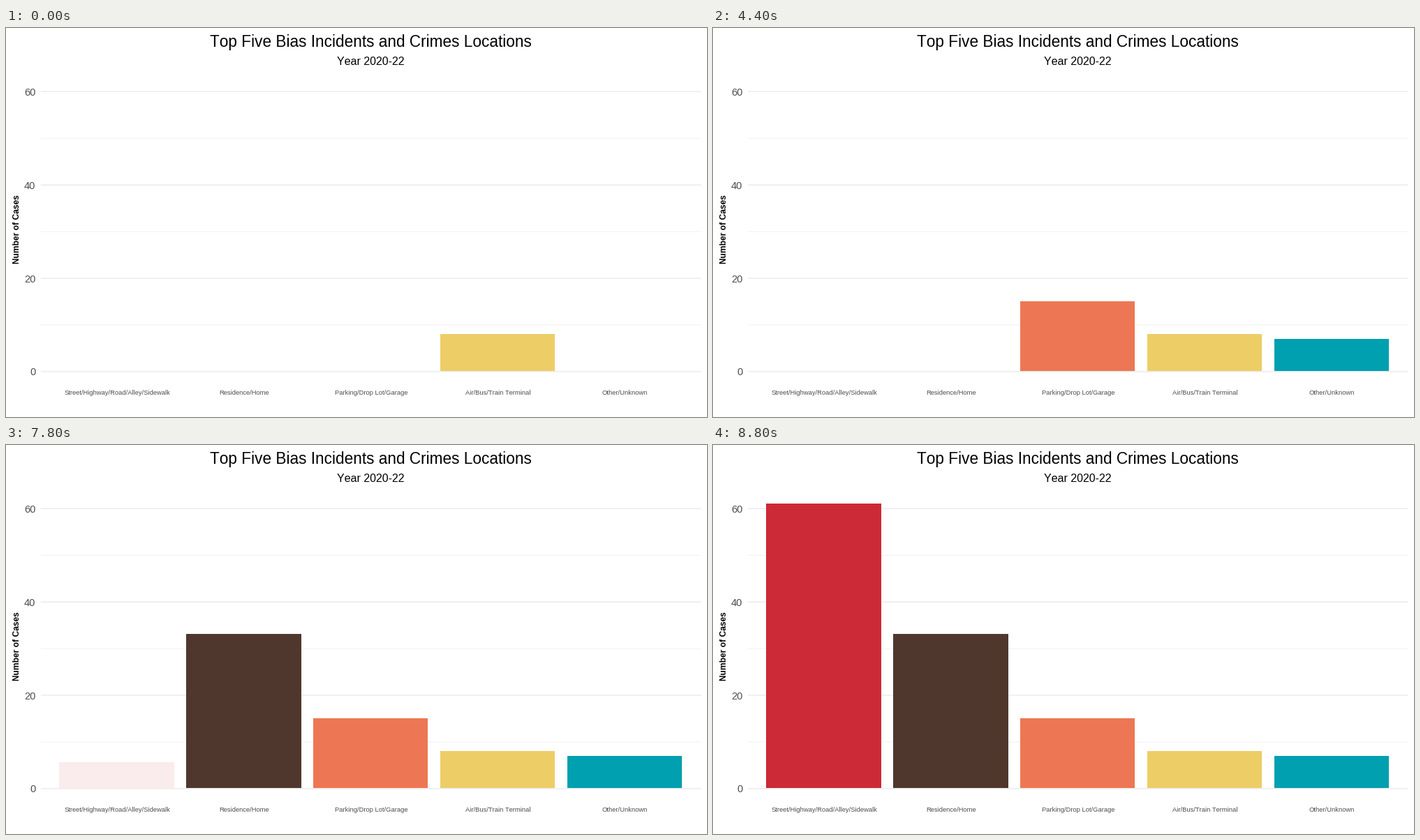
Animation, 1004 px wide and 558 px high, one loop 10 s. Source, as a matplotlib script:

```python
from math import floor

import matplotlib.pyplot as plt
from matplotlib.animation import FuncAnimation
from matplotlib.patches import Rectangle

W, H, DPI = 1004, 558, 64
PT = 72 / DPI                      # points per pixel
FRAMES, INTERVAL = 100, 100
GROW = 11                          # frames a bar takes to rise

BASE, UNIT = 492.9, 6.694          # y of zero, pixels per case
LEFT, RIGHT = 49.9, 995.7
FIRST, STEP, BAR_W = 159.05, 181.88, 164.2

# label, cases, colour, frame the growth counts from, first visible frame
BARS = [
    ("Street/Highway/Road/Alley/Sidewalk", 61, "#CC2A36", 77, 78),
    ("Residence/Home", 33, "#4F372D", 55, 56),
    ("Parking/Drop Lot/Garage", 15, "#ED7754", 33, 35),
    ("Air/Bus/Train Terminal", 8, "#EDCD65", -GROW, 0),
    ("Other/Unknown", 7, "#00A0B0", 11, 12),
]

plt.rcParams["font.family"] = ["Liberation Sans", "DejaVu Sans"]
plt.rcParams["text.kerning_factor"] = 6    # unkerned text
fig = plt.figure(figsize=(W / DPI, H / DPI), dpi=DPI, facecolor="white")
ax = fig.add_axes([0, 0, 1, 1])
ax.set_xlim(0, W)
ax.set_ylim(H, 0)
ax.axis("off")


def label(x, y, text, size, color="black", ha="center", **kw):
    ax.text(x, y, text, fontsize=size * PT, color=color, ha=ha,
            va="baseline", **kw)


def gridline(cases, width):
    y = BASE - cases * UNIT
    ax.plot([LEFT, RIGHT], [y, y], color="#EBEBEB", lw=width * PT,
            solid_capstyle="butt", snap=False, zorder=1)


for cases in (10, 30, 50):
    gridline(cases, 0.71)
for cases in (0, 20, 40, 60):
    gridline(cases, 1.42)
    label(42.3, BASE - cases * UNIT + 5.6, str(cases), 14.67, "#4D4D4D", "right")

label(522.4, 27, "Top Five Bias Incidents and Crimes Locations", 22.67)
label(522.4, 53, "Year 2020-22", 16)
label(19, 288.5, "Number of Cases", 12, weight="bold", rotation=90,
      rotation_mode="anchor")

rects = []
for i, (name, _, color, _, _) in enumerate(BARS):
    x = FIRST + i * STEP
    label(x, 525.5, name, 9.33, "#4D4D4D")
    # bar edges sit on whole pixels
    left, right = floor(x - BAR_W / 2), floor(x + BAR_W / 2)
    rect = Rectangle((left, floor(BASE)), right - left, 0, facecolor=color,
                     linewidth=0, zorder=2)
    rects.append(ax.add_patch(rect))


def draw(n):
    for rect, (_, cases, _, start, first) in zip(rects, BARS):
        part = min((n - start) / GROW, 1) if n >= first else 0
        top = floor(BASE - cases * part * UNIT)
        rect.set_y(top)
        rect.set_height(floor(BASE) - top)
        rect.set_alpha(part)
    return rects


anim = FuncAnimation(fig, draw, frames=FRAMES, interval=INTERVAL,
                     init_func=lambda: draw(0), repeat=True, repeat_delay=0)
plt.show()
```
